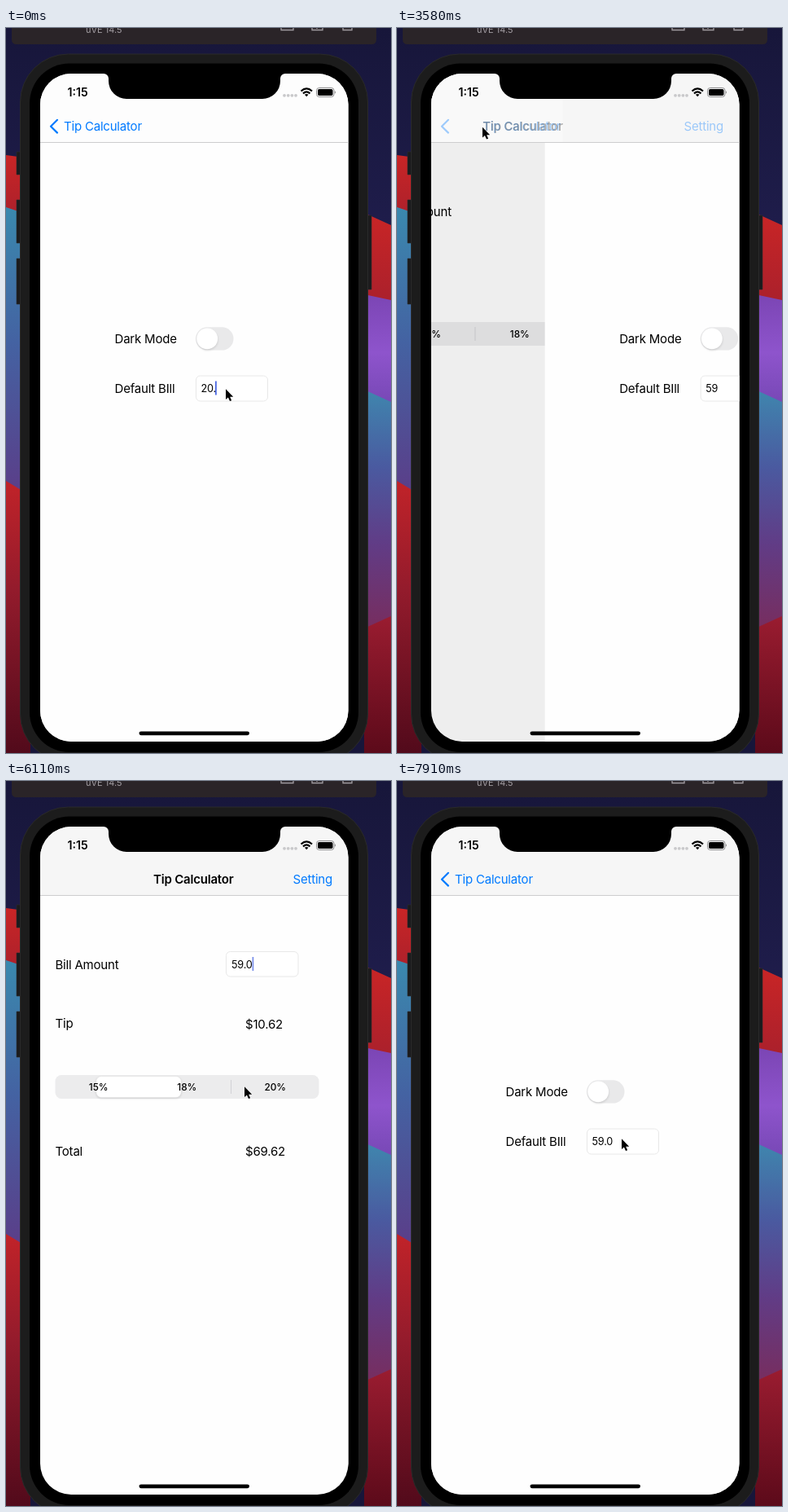
Animation of 473 by 890 pixels, one loop 8 s. Source, as an HTML page:

```html
<!DOCTYPE html>
<html lang="en">
<head>
<meta charset="utf-8">
<title>Tip calculator demo</title>
<style>
  html, body { margin: 0; width: 100%; height: 100%; overflow: hidden; background: #17163a; }
  svg { display: block; width: 473px; height: 890px; }
  text { font: 15px Inter, "Liberation Sans", sans-serif; letter-spacing: -.2px; white-space: pre; }
  .small { font-size: 12.7px; }
  .seg { font-size: 11.8px; font-weight: 500; letter-spacing: 0; text-anchor: middle; }
  .bold { font-weight: 600; }
  .blue { fill: #007aff; }
  .field { fill: #fff; stroke: #e8e8e8; }
  .caret { fill: #4462e2; }
</style>
</head>
<body>
<svg viewBox="0 0 473 890">
  <defs>
    <linearGradient id="navy" x2="0" y2="1">
      <stop stop-color="#17163a"/><stop offset="1" stop-color="#1f1d4c"/>
    </linearGradient>
    <linearGradient id="red" x2="0" y2="1">
      <stop stop-color="#c92526"/><stop offset="1" stop-color="#a8202c"/>
    </linearGradient>
    <linearGradient id="cool" x2="0" y2="1">
      <stop stop-color="#3a89ae"/><stop offset=".45" stop-color="#4462a2"/><stop offset="1" stop-color="#5d3a86"/>
    </linearGradient>
    <linearGradient id="violet" x2="0" y2="1">
      <stop stop-color="#7b45b4"/><stop offset=".5" stop-color="#8e54cc"/><stop offset="1" stop-color="#7446b2"/>
    </linearGradient>
    <linearGradient id="dusk" x2="0" y2="1">
      <stop stop-color="#3f86ae"/><stop offset=".3" stop-color="#4a5aa0"/>
      <stop offset=".6" stop-color="#613c86"/><stop offset="1" stop-color="#7c2a56"/>
    </linearGradient>
    <linearGradient id="wine" x2="0" y2="1">
      <stop stop-color="#c12329"/><stop offset=".4" stop-color="#931b2c"/><stop offset="1" stop-color="#520a1b"/>
    </linearGradient>
    <linearGradient id="rose" x2="0" y2="1">
      <stop stop-color="#9a1c30"/><stop offset="1" stop-color="#5c0a1a"/>
    </linearGradient>
    <clipPath id="screen"><rect x="42" y="56" width="378.5" height="820" rx="38"/></clipPath>
    <filter id="soft" x="-20%" y="-20%" width="140%" height="140%"><feGaussianBlur stdDeviation="1.5"/></filter>
  </defs>

  <!-- wallpaper -->
  <rect width="473" height="260" fill="url(#navy)"/>
  <path d="M0 156L30 160V240H0Z" fill="url(#red)"/>
  <path d="M0 220L30 230V590H0Z" fill="url(#cool)"/>
  <path d="M0 556L30 574V890H0Z" fill="url(#wine)"/>
  <path d="M440 227L473 242V345H440Z" fill="url(#red)"/>
  <path d="M440 327L473 334V470H440Z" fill="url(#violet)"/>
  <path d="M440 444L473 459V760H440Z" fill="url(#dusk)"/>
  <path d="M440 737L473 722V890H440Z" fill="url(#rose)"/>

  <!-- window toolbar -->
  <path d="M7 0V14Q7 20 13 20H449Q455 20 455 14V0Z" fill="#2a2428"/>
  <text x="98" y="6" fill="#a09ba0" style="font-size:11px;letter-spacing:0">uVE 14.5</text>
  <path d="M338 -1V2.500H353V-1M376 -1V2.500H389V-1M414 -1V2.500H425V-1M382 -1V1" fill="none" stroke="#a09ba0" stroke-width="1.300"/>

  <!-- handset -->
  <path d="M13 152H18V180H13ZM13 211H18V264H13ZM13 283H18V339H13ZM444 230H449V321H444Z" fill="#1b1b1d" stroke="#2c2c2c" stroke-width=".6"/>
  <rect x="17.500" y="32" width="427" height="869" rx="59" fill="#1c1c1c" stroke="#2a2a2a"/>
  <rect x="29" y="43.500" width="404" height="845.500" rx="49"/>

  <g clip-path="url(#screen)">
    <rect x="42" y="56" width="379" height="821" fill="#fefefe"/>
    <g id="main">
      <text x="60.500" y="231">Bill Amount</text>
      <rect class="field" x="270.500" y="209.500" width="88.500" height="30.500" rx="5"/>
      <text class="small" x="277" y="229.500">59.0</text>
      <rect id="billCaret" class="caret" x="302.500" y="216" width="1.800" height="17"/>
      <text x="60.500" y="302.500">Tip</text>
      <text id="tip" x="294" y="304"></text>
      <rect x="60.500" y="361" width="324" height="29" rx="7.500" fill="#ececed"/>
      <rect id="div0" x="167" y="367" width="1" height="17" fill="#d2d2d5"/>
      <rect id="div1" x="276" y="367" width="1" height="17" fill="#d2d2d5"/>
      <g id="thumb">
        <rect x="62" y="363.500" width="104.500" height="26" rx="6.500" opacity=".16" filter="url(#soft)"/>
        <rect x="62" y="362.500" width="104.500" height="26" rx="6.500" fill="#fff" stroke="#e2e2e3" stroke-width=".5"/>
      </g>
      <text id="seg0" class="seg" x="113.700" y="380">15%</text>
      <text id="seg1" class="seg" x="222.300" y="380">18%</text>
      <text id="seg2" class="seg" x="330.800" y="380">20%</text>
      <text x="60.500" y="459.500">Total</text>
      <text id="total" x="294" y="459.500"></text>
    </g>
    <rect id="dim" x="42" y="140" width="379" height="737"/>
    <g id="settings">
      <rect x="42" y="140" width="379" height="737" fill="#fefefe"/>
      <text x="133.500" y="387">Dark Mode</text>
      <rect x="233" y="367.300" width="46.500" height="28.300" rx="14.150" fill="#e9e9ea"/>
      <circle cx="247.500" cy="383" r="12.500" opacity=".14" filter="url(#soft)"/>
      <circle cx="247.200" cy="381.400" r="12.900" fill="#fff"/>
      <text x="133.500" y="448">Default BIll</text>
      <rect class="field" x="233.500" y="427" width="88" height="31" rx="5"/>
      <text id="bill" class="small" x="239.500" y="447"></text>
      <rect id="setCaret" class="caret" y="433.500" width="1.800" height="17"/>
    </g>

    <!-- navigation bar -->
    <rect id="bar" x="42" y="56" width="379" height="84"/>
    <rect id="glow" x="42" y="56" height="84" fill="#fbfbfb"/>
    <rect x="42" y="140" width="379" height="1" fill="#cdcdce"/>
    <path id="chevron" d="M63 112.800L55 120.700L63 128.600" fill="none" stroke="#007aff" stroke-width="2.200" stroke-linecap="round" stroke-linejoin="round"/>
    <text id="back" class="blue" y="126">Tip Calculator</text>
    <text id="title" class="bold" y="126">Tip Calculator</text>
    <text id="link" class="blue" x="352.500" y="126">Setting</text>

    <!-- status bar -->
    <text class="bold" x="75.500" y="84.300" style="font-size:14.200px;letter-spacing:0">1:15</text>
    <g fill="#c9c9cb">
      <circle cx="342" cy="82.800" r="1.900"/><circle cx="346.700" cy="82.800" r="1.900"/>
      <circle cx="351.400" cy="82.800" r="1.900"/><circle cx="356" cy="82.800" r="1.900"/>
    </g>
    <g fill="none" stroke="#000" stroke-width="2.200">
      <path d="M362.500 77.500Q369.200 71.300 376 77.500M365 80.300Q369.200 76.600 373.500 80.300"/>
      <path d="M366.900 81.800Q369.200 80 371.500 81.800L369.200 84.300Z" fill="#000" stroke="none"/>
    </g>
    <rect x="381.500" y="73.500" width="21.500" height="11" rx="3.200" fill="none" stroke="#8b8b8d"/>
    <rect x="383" y="75" width="18.500" height="8" rx="1.800"/>
    <path d="M404 77.300Q406 79 404 80.800Z" fill="#8b8b8d"/>
    <path d="M120 56A6 6 0 0 1 126 62V65A22 22 0 0 0 148 87H315A22 22 0 0 0 337 65V62A6 6 0 0 1 343 56Z"/>
    <rect x="163.500" y="863.500" width="135.500" height="4.700" rx="2.350"/>
  </g>

  <g id="pointer">
    <path d="M0 0V15L3.400 11.900L5.800 17.300L8.300 16.200L6 11H10.700Z" transform="translate(.5 .7) scale(.86)" stroke="#fff" paint-order="stroke"/>
  </g>
</svg>
<script>
const LOOP = 8000, WIDTH = 378, POP = 3444, PUSH = 7082, SLIDE = 330;
const el = {};
document.querySelectorAll("svg [id]").forEach(n => el[n.id] = n);

const clamp = v => Math.min(1, Math.max(0, v));
const smooth = v => (v = clamp(v), v * v * (3 - 2 * v));
const mix = (a, b, k) => a + (b - a) * k;
const set = (node, attrs) => { for (const k in attrs) node.setAttribute(k, attrs[k]); };
const fade = (node, v) => node.setAttribute("opacity", clamp(v));
const shift = (node, x, y = 0) => node.setAttribute("transform", `translate(${x} ${y})`);
const write = (node, s) => { if (node.textContent !== s) node.textContent = s; };
const latest = (list, t) => list.filter(k => k[0] <= t).pop();

// time, value
const typed = [[0, "20."], [150, "20"], [300, "2"], [450, ""], [740, "5"], [890, "59"], [4000, "59.0"]];
// time, segment
const picks = [[0, 2], [5230, 0], [5970, 1], [6450, 2]];
const rates = [.15, .18, .2];
// time, x, y
const route = [
  [0, 269.5, 442.5], [1700, 269.5, 442.5], [1940, 350, 580], [2090, 387, 675], [2390, 384, 738],
  [2530, 382, 742], [2700, 382, 742], [2980, 300, 560], [3280, 140, 180], [3430, 104.5, 121],
  [3730, 104.5, 121], [4030, 190, 165], [4330, 300, 222], [4480, 311.5, 223.5], [4630, 311.5, 223.5],
  [4930, 200, 330], [5230, 112, 372], [5530, 112, 372], [5830, 215, 375], [5960, 222, 375],
  [6110, 292.5, 374.5], [6260, 325, 374], [6480, 325, 374], [6860, 392, 97], [7010, 395.5, 116],
  [7310, 395.5, 116], [7610, 340, 250], [7910, 275.5, 438.5], [LOOP, 275.5, 438.5]
];

const tickTime = n => 150 * n - 10 * [4, 17, 35, 38].filter(k => n >= k).length;
function tick(t) {
  let n = Math.ceil(t / 148) + 1;
  while (tickTime(n) > t) n--;
  return tickTime(n);
}

function movePointer(t) {
  const i = route.findIndex(k => k[0] > t);
  const [a, b] = [route[i - 1], route[i]];
  const k = (t - a[0]) / (b[0] - a[0]);
  shift(el.pointer, mix(a[1], b[1], k), mix(a[2], b[2], k));
}

function drawSegments(t) {
  const i = picks.lastIndexOf(latest(picks, t));
  const [start, target] = picks[i];
  const from = i ? picks[i - 1][1] : target;
  const pos = mix(from, target, smooth((t - start) / 300));
  shift(el.thumb, pos * 108.3);
  fade(el.div0, (pos - 1) * 2);
  fade(el.div1, (1 - pos) * 2);
  for (let s = 0; s < 3; s++) el["seg" + s].style.fontWeight = pos === s ? 600 : 500;
  const bill = i ? 59 : 5000, tip = bill * rates[target];
  write(el.tip, "$" + tip.toFixed(2));
  write(el.total, "$" + (bill + tip).toFixed(2));
}

function drawPages(t) {
  const pushing = t >= PUSH;
  const shown = pushing ? smooth((t - PUSH) / SLIDE) : 1 - smooth((t - POP) / SLIDE);
  const off = 1 - shown;
  shift(el.main, -.3 * WIDTH * shown);
  shift(el.settings, WIDTH * off);
  fade(el.dim, .1 * shown);

  const moving = shown > 0 && shown < 1;
  set(el.bar, { fill: t < POP ? "#fdfdfd" : "#f6f6f6" });
  set(el.glow, { width: Math.min(WIDTH, WIDTH * off + 22), opacity: moving ? .8 : 0 });

  const x = 71 + 110 * off ** (pushing ? .92 : 1.17);
  const backFade = pushing ? shown ** .8 : 1 - 1.6 * off;
  set(el.back, { x });
  set(el.title, { x });
  fade(el.back, backFade);
  fade(el.chevron, pushing ? backFade : off);
  fade(el.back, pushing ? backFade : off);
  fade(el.title, off ** 1.2);
  fade(el.link, pushing ? 1 - 1.25 * shown : off);
  if (!moving) {
    fade(el.back, shown);
    fade(el.chevron, shown);
  }
}

function drawFields(t) {
  const lit = t < 890 || (t - 890) % 1000 < 600;
  write(el.bill, latest(typed, t)[1]);
  const width = el.bill.textContent ? el.bill.getComputedTextLength() : 0;
  set(el.setCaret, { x: 238.5 + width });
  fade(el.setCaret, lit && t < POP ? .95 : 0);
  fade(el.billCaret, lit && t >= 4330 && t < PUSH ? .7 : 0);
}

function render(now) {
  const t = tick(now % LOOP);
  drawPages(t);
  drawSegments(t);
  drawFields(t);
  movePointer(t);
}

const begin = performance.now();
function loop() {
  render(performance.now() - begin);
  requestAnimationFrame(loop);
}
loop();
</script>
</body>
</html>
```
